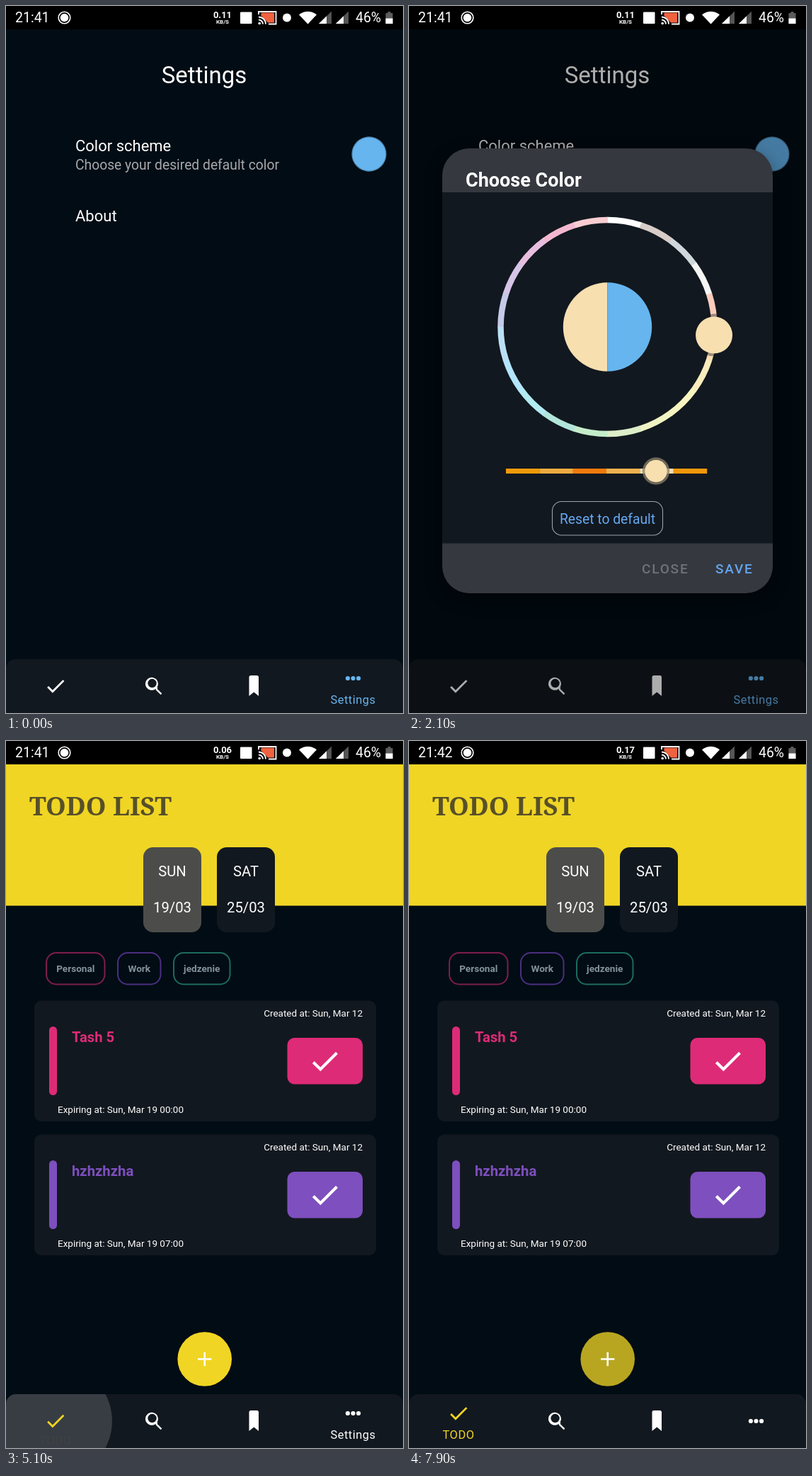
An HTML page that plays this animation: 561x998 px, repeating every 8 s.

```html
<!DOCTYPE html>
<html lang="en">
<head>
<meta charset="utf-8">
<title>Color scheme settings</title>
<style>
  html, body { margin: 0; width: 100%; height: 100%; overflow: hidden; background: #020c14; }
  svg { display: block; width: 561px; height: 998px; font-family: Roboto, sans-serif; }
  .mid { text-anchor: middle; }
  .end { text-anchor: end; }
  .bold { font-weight: 700; }
  .button { font-weight: 500; letter-spacing: 1.8px; }
  .label { text-anchor: middle; letter-spacing: .5px; }
  .serif { font-family: "Noto Serif", serif; font-weight: 700; }
  #dialog { filter: drop-shadow(0 8px 12px rgba(0, 0, 0, .4)); }
</style>
</head>
<body>
<svg id="stage" viewBox="0 0 561 998"></svg>
<script>
const LOOP = 8000, SAVE = 4450, TODO = 5080;
const PANEL = '#12181f', BLUE = '#66b5ee', YELLOW = '#f0d524';
const CX = 280.5, CY = 453, RING = 151;
const BAR_X = 137, BAR_STEP = 284 / 6;

// Hues clockwise from the top, in a medium, a light and a full shade.
const hues = list => list.split(' ').map(c => '#' + c);
const medium = hues('ffffff a1887f 90a4ae e0e0e0 f4806a f2b150 f2dc5a f8f076 dce775 aed581 81d084 52bba8 4dd4dc 4fc3ee 66b5ee 7986cb 9069cd b65fc8 ec5592 e06673');
const light = hues('ffffff d7ccc8 cfd8dc f5f5f5 fbccbc f7dfb0 f9ecbd f9f5c0 f0f4c3 dcedc8 c4ecc9 b2e6db b2ebf2 b3e5fc bbdff5 c5cae9 d6c4e6 e8bee0 f3b8d0 f8cdd2');
const full = hues('ffffff 795548 607d8b 9e9e9e ff5722 f2980a f0d524 ffeb3b cddc39 8bc34a 4caf50 009688 00bcd4 03a9f4 2299ee 3f51b5 673ab7 9c27b0 e91e63 f44336');
const accents = {
  5: hues('f29a0a f0ab40 f37a0c'),
  6: hues('f0c30b f0cf3c f0a010'),
  14: hues('3a80ee 4a8cf0 2a7bcb')
};
const shadesOf = h => [...(accents[h] || [full[h], medium[h], full[h]]), medium[h], light[h], full[h]];

const text = (x, y, size, fill, str, cls = '', extra = '') =>
  `<text x="${x}" y="${y}" font-size="${size}" fill="${fill}" class="${cls}" ${extra}>${str}</text>`;
const box = (x, y, w, h, r, fill, extra = '') =>
  `<rect x="${x}" y="${y}" width="${w}" height="${h}" rx="${r}" fill="${fill}" ${extra}/>`;
const disc = (x, y, r, fill, extra = '') =>
  `<circle cx="${x}" cy="${y}" r="${r}" fill="${fill}" ${extra}/>`;
const path = (d, fill, extra = '') => `<path d="${d}" fill="${fill}" ${extra}/>`;
const icon = (d, x, y, s, fill = '#fff') =>
  path(d, fill, `transform="translate(${x} ${y}) scale(${s}) translate(-12 -12)"`);

const CHECK = 'M9 16.17L4.83 12l-1.42 1.41L9 19 21 7l-1.41-1.41z';
const SEARCH = 'M15.5 14h-.79l-.28-.27A6.5 6.5 0 1 0 13 15.24l.27.28v.79l5 4.99L19.49 20l-4.99-5zM9.5 14a4.5 4.5 0 1 1 0-9 4.5 4.5 0 0 1 0 9z';
const PENCIL = 'M3 17.25V21h3.75L17.81 9.94l-3.75-3.75zM20.71 7.04a1 1 0 0 0 0-1.41l-2.34-2.34a1 1 0 0 0-1.41 0l-1.83 1.83 3.75 3.75z';

const polar = deg => {
  const a = deg * Math.PI / 180;
  return [CX + RING * Math.sin(a), CY - RING * Math.cos(a)];
};

const signal = x => path(`M${x} 25V25L${x + 18} 7.5V25z`, '#555') +
  path(`M${x} 25L${x + 11} 14.3V25z`, '#fff');

const statusBar = () => box(0, 0, 561, 33, 0, '#000') +
  text(13, 23, 19.5, '#fff', '21:41', '', 'id="clock"') +
  disc(82.5, 16.5, 8.3, 'none', 'stroke="#fff" stroke-width="1.6"') + disc(82.5, 16.5, 5.8, '#fff') +
  text(306, 16.5, 13, '#fff', '0.11', 'mid bold', 'id="speed"') +
  text(306, 25, 8, '#fff', 'KB/S', 'mid bold') +
  box(331, 8.5, 16.5, 16.5, 1, '#fff') +
  path('M361 9.5H379V23.5H370L360 13z', '#f0623f') +
  path('M357 12V8H381.5V25.5H371M357 15.5A10 10 0 0 1 367 25.5M357 19.5A6 6 0 0 1 363 25.5', 'none', 'stroke="#fff" stroke-width="1.8"') +
  disc(358.2, 24.5, 1.8, '#fff') +
  disc(397, 16.5, 6, '#fff') +
  path('M414 12.2Q426.5 3.5 439 12.2L426.5 25.5z', '#fff') +
  signal(442) + signal(466) +
  text(494, 23, 19.4, '#fff', '46%') +
  path('M536.5 10H539.5V8H543.5V10H546.5V25H536.5z', '#5c5c5c') + box(536.5, 17.5, 10, 7.5, 0, '#fff');

const settings = () => `<g id="settings">` +
  text(280, 109, 33, '#fff', 'Settings', 'mid') +
  text(98, 205, 22, '#fff', 'Color scheme') +
  text(98, 231, 19.3, '#a6a9ac', 'Choose your desired default color') +
  text(98, 304, 22, '#fff', 'About') +
  disc(513, 209, 24.7, BLUE, 'id="swatch"') +
  disc(513, 209, 24.7, 'none', 'stroke="#000" stroke-opacity=".3" stroke-width="2.5"') + '</g>';

const dateChip = (x, fill, day, date) => box(x, 150, 82, 120, 14, fill) +
  text(x + 41, 191, 20.2, '#fff', day, 'mid') + text(x + 41, 242, 20.3, '#fff', date, 'mid');

const tag = (x, w, color, name) =>
  box(x, 299, w, 44.5, 14, 'none', `stroke="${color}" stroke-width="2"`) +
  text(x + w / 2, 326, 13.6, '#83939d', name, 'mid bold');

const card = (y, color, title, hour) => box(40, y, 483, 170.5, 10, PANEL) +
  box(61, y + 36.5, 11, 97, 5.5, color) +
  text(93, y + 58.5, 20.3, color, title, 'bold') +
  text(504, y + 22.5, 13.5, '#fff', 'Created at: Sun, Mar 12', 'end') +
  text(73, y + 158, 13.5, '#fff', `Expiring at: Sun, Mar 19 ${hour}`) +
  box(397.5, y + 52.5, 106.5, 65.5, 10, color) + icon(CHECK, 450.5, y + 85.5, 2.05);

const todo = () => `<g id="todo">` + box(0, 33, 561, 199.5, 0, YELLOW) +
  text(33, 105, 36.5, '#575029', 'TODO LIST', 'serif') +
  dateChip(194, '#4c4d4a', 'SUN', '19/03') + dateChip(298, PANEL, 'SAT', '25/03') +
  tag(57, 82.5, '#7d1d4e', 'Personal') + tag(158, 60.5, '#4a2f80', 'Work') + tag(237, 79.5, '#1d6b60', 'jedzenie') +
  card(366.5, '#de2b77', 'Tash 5', '00:00') +
  `<clipPath id="row">${box(40, 555, 483, 172, 0, '#fff')}</clipPath>
   <clipPath id="gap">${box(523, 555, 0, 172, 0, '#fff', 'id="gapBox"')}</clipPath>
   <g clip-path="url(#gap)">${box(361, 555.5, 162, 170.5, 0, '#66ff59')}
     ${icon(PENCIL, 442, 638, 1.02)}${text(441, 674.5, 21, '#fff', 'EDIT', 'mid')}</g>
   <g clip-path="url(#row)"><g id="swiped">${card(555.5, '#7e4fbe', 'hzhzhzha', '07:00')}</g></g>` +
  disc(280.7, 872.5, 38.3, YELLOW, 'id="fab"') +
  path('M271 872.5h19.4M280.7 862.8v19.4', 'none', 'stroke="#fff" stroke-width="2.6"') + '</g>';

const nav = () => `<clipPath id="bar"><path d="M0 998V936a14 14 0 0 1 14-14H547a14 14 0 0 1 14 14V998z"/></clipPath>
  <g clip-path="url(#bar)">` + box(0, 922, 561, 76, 0, PANEL) +
  disc(70, 960, 0, '#fff', 'id="ripple"') + '</g>' +
  `<g id="tabTodo"><g>${icon(CHECK, 70, 960, 1.38, 'currentColor')}</g>` +
  text(70, 984.5, 16.4, 'currentColor', 'TODO', 'label') + '</g>' +
  icon(SEARCH, 210, 959.5, 1.38) +
  path('M343.5 974V947.5q0-2.5 2.5-2.5h8.5q2.5 0 2.5 2.5V974l-6.7-5.5z', '#fff') +
  `<g id="tabSettings"><g>${[-7.6, 0, 7.6].map(d => disc(490.5 + d, 960, 3.1, 'currentColor')).join('')}</g>` +
  text(490.5, 984.5, 16.4, 'currentColor', 'Settings', 'label') + '</g>';

const arc = (_, i) => {
  const from = polar(i * 18), to = polar(i * 18 + 18.2);
  return path(`M${from}A${RING} ${RING} 0 0 1 ${to}`, 'none', 'class="arc" stroke-width="8.5"');
};
const half = (id, sweep) => path(`M${CX} ${CY - 62.7}A62.7 62.7 0 0 ${sweep} ${CX} ${CY + 62.7}z`, BLUE, `id="${id}"`);

const dialog = () => box(0, 33, 561, 965, 0, '#000', 'id="scrim"') +
  `<clipPath id="frame">${box(47, 201, 467, 628, 38, '#fff')}</clipPath>
   <g id="dialog"><g clip-path="url(#frame)">` +
  box(47, 201, 467, 628, 0, '#35383e') + box(47, 263, 467, 495.5, 0, PANEL) + '</g>' +
  text(80, 254.5, 27, '#fff', 'Choose Color', 'bold') +
  Array.from({ length: 20 }, arc).join('') +
  half('newColor', 0) + half('oldColor', 1) +
  `<g id="knob">${disc(0, 0, 30, PANEL, 'opacity=".4"')}${disc(0, 0, 26, BLUE, 'class="picked"')}</g>` +
  Array.from({ length: 6 }, (_, i) => box(BAR_X + i * BAR_STEP, 653, BAR_STEP + .2, 7, 0, BLUE, 'class="step"')).join('') +
  `<g id="slider">${disc(0, 0, 19.2, PANEL, 'opacity=".6"')}${disc(0, 0, 19.2, BLUE, 'class="picked" opacity=".4"')}${disc(0, 0, 15.7, BLUE, 'class="picked"')}</g>` +
  box(202.5, 699.5, 156, 47.5, 13, 'none', 'stroke="#9da2a8" stroke-width="1.1"') +
  text(280.5, 731, 19.3, '#66a8f2', 'Reset to default', 'mid') +
  text(329, 801, 19, '#6f7276', 'CLOSE', 'button') +
  text(433, 801, 19, '#64a5f0', 'SAVE', 'button') + '</g>';

const stage = document.getElementById('stage');
stage.innerHTML = box(0, 0, 561, 998, 0, '#020c14') + settings() + todo() + nav() + dialog() + statusBar();

const $ = id => document.getElementById(id);
const all = sel => [...stage.querySelectorAll(sel)];
const arcs = all('.arc'), steps = all('.step'), picked = all('.picked');
const set = (el, attrs) => { for (const k in attrs) el.setAttribute(k, attrs[k]); };
const move = (el, x, y) => el.setAttribute('transform', `translate(${x} ${y})`);

// Eased value through [time, value] keys.
function track(t, ...keys) {
  if (t <= keys[0][0]) return keys[0][1];
  for (let i = 1; i < keys.length; i++) {
    const [t0, v0] = keys[i - 1], [t1, v1] = keys[i];
    if (t < t1) {
      const p = (t - t0) / (t1 - t0);
      return v0 + (v1 - v0) * p * p * (3 - 2 * p);
    }
  }
  return keys[keys.length - 1][1];
}

function setTab(tab, active, color) {
  const [glyph, label] = tab.children;
  tab.style.color = color;
  move(glyph, 0, -11 * active);
  move(label, 0, 9 * (1 - active));
  label.setAttribute('opacity', active);
}

function drawPicker(t) {
  const angle = track(t, [1300, 261.3], [1800, 94.4], [2200, 94.4], [2900, 254], [3500, 117]);
  const x = track(t, [1850, 302], [2050, 349], [3500, 349], [3600, 351], [3750, 351], [4200, 397]);
  const hue = Math.floor(angle / 18), shade = Math.floor((x - BAR_X) / BAR_STEP);
  const ring = [medium, light, full][shade - 3], shades = shadesOf(hue);
  arcs.forEach((a, i) => set(a, { stroke: ring[i] }));
  steps.forEach((s, i) => set(s, { fill: shades[i] }));
  [...picked, $('newColor')].forEach(el => set(el, { fill: ring[hue] }));
  move($('knob'), ...polar(angle));
  move($('slider'), x, 656.5);

  const shown = track(t, [800, 0], [1050, 1], [SAVE, 1], [4650, 0]);
  set($('dialog'), { opacity: shown });
  set($('scrim'), { opacity: shown * .32 });
}

function draw(t) {
  const onTodo = t >= TODO, accent = t < SAVE ? BLUE : YELLOW;
  $('settings').style.display = onTodo ? 'none' : '';
  $('todo').style.display = onTodo ? '' : 'none';
  set($('swatch'), { fill: accent });
  drawPicker(t);

  setTab($('tabTodo'), track(t, [TODO, 0], [TODO + 220, 1]), onTodo ? YELLOW : '#fff');
  setTab($('tabSettings'), track(t, [TODO + 20, 1], [TODO + 240, 0]), onTodo ? '#fff' : accent);
  set($('ripple'), {
    r: track(t, [4940, 0], [5100, 80], [5250, 90]),
    opacity: track(t, [4940, .16], [5150, .16], [5400, 0])
  });

  const swipe = track(t, [6283, 0], [7333, 162], [7400, 162], [7650, 0]);
  move($('swiped'), -swipe, 0);
  set($('gapBox'), { x: 523 - swipe, width: swipe });
  set($('fab'), { opacity: track(t, [7700, 1], [7850, .77]) });

  $('clock').textContent = t < 5900 ? '21:41' : '21:42';
  $('speed').textContent = t < 3000 ? '0.11' : t < 6000 ? '0.06' : '0.17';
}

const start = performance.now();
function frame() {
  draw((performance.now() - start) % LOOP);
  requestAnimationFrame(frame);
}
frame();
</script>
</body>
</html>
```
